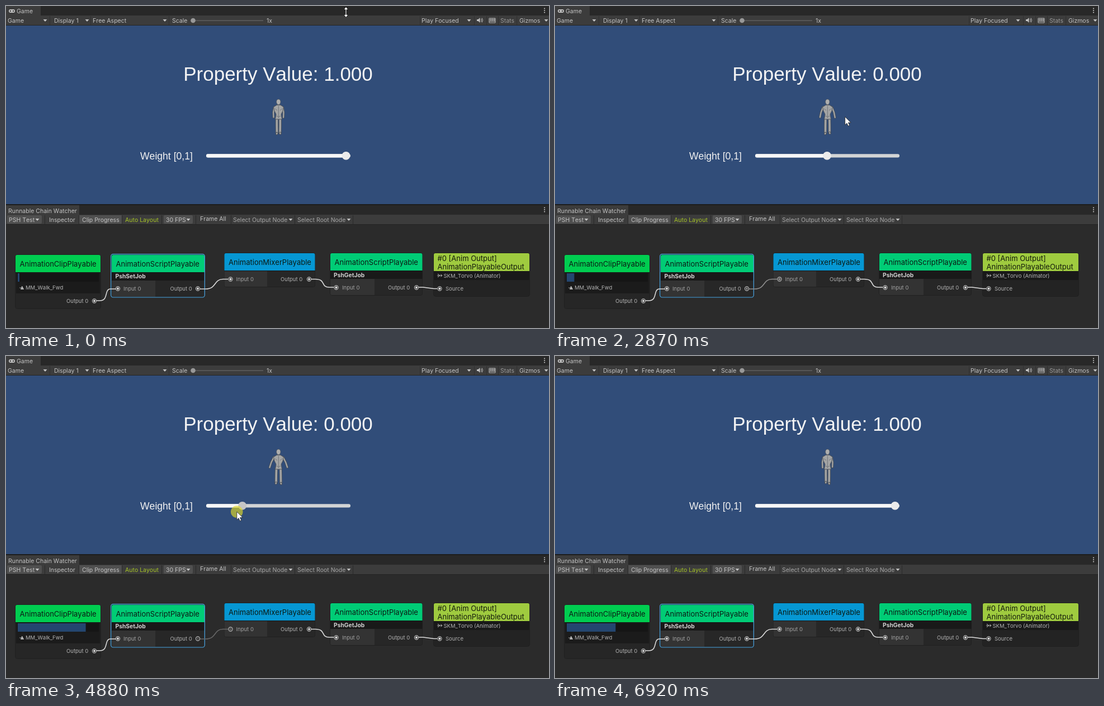
These frames come from a looping animation (971 px wide and 577 px high, 6960 ms). An HTML page with a canvas:

```html
<!DOCTYPE html>
<html lang="en">
<head>
<meta charset="utf-8">
<title>Weight slider</title>
<style>
html, body { margin: 0; width: 100%; height: 100%; overflow: hidden; background: #2b2b2b; }
canvas { display: block; }
</style>
</head>
<body>
<canvas id="stage" width="971" height="577"></canvas>
<script>
const c = document.getElementById('stage').getContext('2d');
const LOOP = 6960, UI = 'Inter, sans-serif', ARIAL = '"Liberation Sans", Arial, sans-serif';
c.fontKerning = 'none';

// Pointer path: time, x, y
const path = [
  [0, 608, 11], [40, 607, 14], [300, 591, 165], [500, 597, 228], [700, 604, 272], [820, 603, 272],
  [1110, 551, 272], [1350, 489, 273], [1450, 487, 274], [1500, 490, 272], [1720, 640, 148],
  [1900, 638, 120], [2060, 600, 101], [2230, 562, 109], [2340, 566, 140], [2480, 620, 150],
  [2580, 651, 118], [2680, 615, 91], [2780, 570, 120], [2880, 515, 205], [3000, 489, 267],
  [3260, 488, 268], [3510, 567, 267], [3590, 596, 267], [3720, 623, 268], [4080, 623, 269],
  [4200, 597, 269], [4280, 591, 269], [4360, 566, 270], [5000, 385, 281], [5300, 370, 285],
  [5480, 378, 286], [5600, 445, 287], [5760, 597, 287], [5860, 637, 287], [6080, 637, 286],
  [6480, 625, 45], [6640, 622, -30]
];

const lerp = (a, b, k) => a + (b - a) * k;
const clamp = v => Math.min(1, Math.max(0, v));

function pointer(t) {
  const last = path.length - 1;
  if (t >= path[last][0]) return path[last].slice(1);
  const i = Math.max(0, path.findIndex(k => k[0] > t) - 1);
  const a = path[i], b = path[i + 1], span = b[0] - a[0], u = (t - a[0]) / span;
  const slope = (n, d) => {
    const p = path[Math.max(0, n - 1)], q = path[Math.min(last, n + 1)];
    return (q[d] - p[d]) / (q[0] - p[0]) * span;
  };
  return [1, 2].map(d => a[d] * (1 + 2 * u) * (1 - u) ** 2 + slope(i, d) * u * (1 - u) ** 2
    + b[d] * u * u * (3 - 2 * u) + slope(i + 1, d) * u * u * (u - 1));
}

const pressed = t => t > 760 && t < 1450 || t > 3200 && t < 6050;

function weightAt(t) {
  if (!pressed(t)) return t > 1000 && t < 4000 ? 0.5 : 1;
  return clamp((pointer(t - 38)[0] - 365) / 243);
}

function rect(x, y, w, h, fill, r = 0) {
  c.fillStyle = fill;
  c.beginPath();
  c.roundRect(x, y, w, h, r);
  c.fill();
}

function dot(x, y, r, fill) {
  c.fillStyle = fill;
  c.beginPath();
  c.arc(x, y, r, 0, 7);
  c.fill();
}

// y is the middle of the capitals
function text(s, x, y, size = 10.5, fill = '#c4c4c4', family = UI, weight = 400) {
  c.font = `${weight} ${size}px ${family}`;
  c.fillStyle = fill;
  c.fillText(s, x, y + size * 0.36);
}

function shape(d, fill, stroke, width = 1) {
  const p = new Path2D(d);
  if (fill) { c.fillStyle = fill; c.fill(p); }
  if (stroke) { c.strokeStyle = stroke; c.lineWidth = width; c.stroke(p); }
}

const arrow = (x, y) => shape(`M${x - 3.5},${y - 2}h7l-3.5,4z`, '#c4c4c4');

function gameBar() {
  rect(0, 0, 971, 17, '#282828');
  rect(0, 0, 62, 17, '#3c3c3c');
  rect(0, 17, 971, 18, '#3c3c3c');
  rect(0, 34, 971, 1, '#242424');
  rect(5, 6, 11, 6, '#c4c4c4', 3);
  dot(8, 9, 1.3, '#3c3c3c');
  dot(13, 9, 1.3, '#3c3c3c');
  text('Game', 19, 9);
  text('Game', 3, 26);
  text('Display 1', 86, 26);
  text('Free Aspect', 155, 26);
  text('Scale', 297, 26);
  text('1x', 466, 26);
  text('Play Focused', 743, 26);
  text('Stats', 884, 26, 10.5, '#9a9a9a');
  text('Gizmos', 918, 26);
  [70, 145, 284, 828, 966].forEach(x => arrow(x, 26));
  [78, 151, 291, 740, 837, 859, 880, 913].forEach(x => rect(x, 18, 1, 16, '#303030'));
  rect(334, 25.5, 126, 1.2, '#666');
  dot(334.5, 26, 4.3, '#999');
  shape('M842,24h2.5l3,-3v9l-3,-3h-2.5z', '#c4c4c4');
  shape('M849.5,23q1.8,2.5 0,5M851,21.5q3,4 0,8', null, '#c4c4c4');
  shape('M864,22h11v8h-11zM864,24.7h11M864,27.3h11M867,22v5M870,22v5M873,22v5', null, '#b8b8b8');
  kebab(8);
}

function kebab(y) {
  [-3.5, 0, 3.5].forEach(d => dot(963, y + d, 1.1, '#c4c4c4'));
}

function graphBar() {
  rect(0, 355, 971, 222, '#2b2b2b');
  rect(0, 355, 971, 19, '#282828');
  rect(0, 355, 971, 2, '#1c1c1c');
  rect(0, 357, 131, 17, '#3c3c3c');
  rect(0, 374, 971, 17, '#3c3c3c');
  rect(0, 391, 971, 1, '#232323');
  text('Runnable Chain Watcher', 4, 367);
  kebab(365);
  rect(2, 375, 62, 15, '#505050', 2);
  rect(131, 375, 76, 15, '#505050');
  rect(282, 375, 52, 15, '#505050', 2);
  [69, 130, 207, 278, 339, 402, 516, 620].forEach(x => rect(x, 375, 1, 16, '#2a2a2a'));
  text('PSH Test', 5, 383);
  text('Inspector', 77, 383);
  text('Clip Progress', 136, 383);
  text('Auto Layout', 213, 383, 10.5, '#a5c326');
  text('30 FPS', 286, 383);
  text('Frame All', 347, 381.5);
  text('Select Output Node', 406, 383, 10.5, '#a6a6a6');
  text('Select Root Node', 521, 383, 10.5, '#a6a6a6');
  [56, 326, 509, 613].forEach(x => arrow(x, 383));
}

function port(x, y, fill = 1) {
  c.strokeStyle = '#bdbdbd';
  c.lineWidth = 1.1;
  c.beginPath();
  c.arc(x, y, 3.6, 0, 7);
  c.stroke();
  dot(x, y, 2, `rgba(220,220,220,${fill})`);
}

function node(x, y, w, h, head, color, title) {
  rect(x - 0.5, y - 0.5, w + 1, h + 1, '#171717', 4);
  rect(x, y, w, h, '#232323', 3);
  rect(x, y, w, head, color, [3, 3, 0, 0]);
  rect(x, y + head, w, 1, '#161616');
  if (title) text(title, x + 7.5, y + head / 2 + 0.5, 13, '#0b1a14');
}

function ports(x, y, w, h, split, mid) {
  rect(x, y, split - x, h, '#333', [0, 0, 0, 3]);
  rect(split, y, x + w - split, h, '#272727', [0, 0, 3, 0]);
  text('Input 0', x + 21, mid, 9.5, '#a0a0a0');
  text('Output 0', x + w - 61.5, mid, 9.5, '#b0b0b0');
}

function graph(t, w) {
  node(17, 446, 152, 96, 31, '#00cd50', 'AnimationClipPlayable');
  rect(18, 478, 150, 37, '#1b1b1b');
  rect(20, 479, 146, 15, '#151515');
  rect(21, 479, (3 + t * 0.0538) % 144, 15, '#24466f');
  rect(17, 515, 152, 27, '#262626', [0, 0, 3, 3]);
  shape('M24,505h3M26.5,507.5l2.2,-5.5l3,5.5z', '#b8b8b8', '#b8b8b8', 0.8);
  text('MM_Walk_Fwd', 35, 505, 9.5, '#b4b4b4');
  text('Output 0', 108, 528.5, 9.5, '#b4b4b4');

  node(189, 446, 166, 75, 31, '#00cc76', 'AnimationScriptPlayable');
  rect(189, 478, 166, 14, '#191919');
  text('PshSetJob', 195.5, 484.5, 10.3, '#d0d0d0', UI, 700);
  ports(189, 492, 166, 29, 267, 506.5);
  c.strokeStyle = '#4ba8e6';
  c.lineWidth = 1.2;
  c.beginPath();
  c.roundRect(187.7, 444.6, 167.6, 77.4, 4);
  c.stroke();

  node(390.5, 443, 162, 60, 31, '#0697d3', 'AnimationMixerPlayable');
  ports(390.5, 475, 162, 28, 467, 489.5);

  node(580, 443, 164.5, 75, 31, '#00cc76', 'AnimationScriptPlayable');
  rect(580, 475, 164, 14, '#191919');
  text('PshGetJob', 586, 482, 10.3, '#d0d0d0', UI, 700);
  ports(580, 489, 164.5, 29, 659, 504.5);

  node(765, 443, 171, 77, 32, '#9fcb3f');
  text('#0 [Anim Output]', 771.5, 452, 13, '#131a0b');
  text('AnimationPlayableOutput', 771.5, 467, 13, '#131a0b');
  rect(765, 476, 171, 15, '#191919');
  shape('M771,483h9M772,480l3.5,3l-3.5,3M777.5,481l2.5,2l-2.5,2', null, '#bbb');
  text('SKM_Torvo (Animator)', 782.5, 483.5, 9.5, '#b4b4b4');
  text('Source', 786, 507, 9.5, '#b0b0b0');

  const link = (d, v = 220) => shape(d, null, `rgb(${v},${v},${v})`, 1.6);
  link('M162,528h6C184,528 175,507 187,507h9');
  link('M347,507h10C377,507 371,489.500 388,489.500h9', lerp(66, 220, w));
  link('M546,489.500h7C573,489.500 562,504 578,504h8');
  link('M738,504h8L765,506.500h6');
  port(158, 528.5);
  port(200, 506.5);
  port(343, 506.5, w);
  port(401.5, 489.5, w);
  port(542, 489.5);
  port(590.5, 504.5);
  port(734, 504.5);
  port(775.5, 506.5);
}

function limb(points, width) {
  c.lineCap = c.lineJoin = 'round';
  const d = 'M' + points.map(p => p.join()).join('L');
  shape(d, null, '#444a52', width + 1.2);
  shape(d, null, '#a2a3a3', width - 0.4);
  c.lineCap = 'butt';
  c.lineJoin = 'miter';
}

function figure(t, w) {
  const phase = (t * 0.0538 + 3) / 144 * Math.PI * 2;
  for (const side of [-1, 1]) {
    const swing = w * Math.sin(phase) * side, lift = Math.max(0, swing) * 3;
    const at = (a, b, y) => [487.3 + side * lerp(a, b, w), y];
    limb([at(4, 3, 201), at(4.4, 3, 214 - lift * 0.4), at(4.7, 2.8, 227.5 - lift)], 4);
    limb([at(4.7, 2.8, 228 - lift), at(5.2, 3.2, 229 - lift)], 3);
    limb([at(8.5, 7.5, 181.5), at(14, 9.2, 190.5), at(18, 8.8, 199.5 + swing)], 2.8);
  }
  rect(485.2, 174, 4.4, 6, '#858687');
  shape('M478.500,181L484,177.500h7L496.300,181L495,188L492,194L493.500,203H481.500L483,194L480,188Z',
    '#a4a5a5', '#4a5059', 0.9);
  shape('M487.300,179v22M481,184l4,3M494,184l-4,3M483.500,197q4,3 8,0', null, '#6c7075', 0.9);
  shape('M487.300,167c5,0 5,9 0,10c-5,-1 -5,-10 0,-10z', '#adaeae', '#50565e', 0.8);
}

function slider(t, w) {
  const x = 365 + 243 * w;
  text('Weight [0,1]', 240, 269, 17.6, '#f2f2f2', ARIAL);
  rect(358, 265.2, 258, 6.3, '#d3d5d5', 3);
  rect(358, 265.2, x - 358, 6.3, '#f8f8f8', 3);
  dot(x, 268.3, 7.4, pressed(t) ? '#c6c6c6' : '#ebebeb');
}

function drawPointer(t) {
  const [x, y] = pointer(t);
  if (pressed(t)) dot(x, y, 10.8, 'rgba(225,218,40,.65)');
  c.save();
  c.translate(x, y);
  if (y < 20) shape('M0,-9.500l4,5h-3v9h3l-4,5l-4,-5h3v-9h-3z', '#fff', '#111', 0.8);
  else shape('M0,0v14.500l3.300,-3l2.300,5l2.500,-1.100l-2.300,-4.900h4.700z', '#fff', '#222', 0.8);
  c.restore();
}

function draw(now) {
  const t = now % LOOP, w = weightAt(t);
  rect(0, 35, 971, 320, '#314d79');
  gameBar();
  graphBar();
  c.textAlign = 'center';
  text(`Property Value: ${w < 1 ? '0.000' : '1.000'}`, 486.5, 121.5, 35, '#f4f4f4', ARIAL);
  c.textAlign = 'left';
  figure(t, w);
  slider(t, w);
  graph(t, w);
  drawPointer(t);
  requestAnimationFrame(draw);
}
requestAnimationFrame(draw);
</script>
</body>
</html>
```
